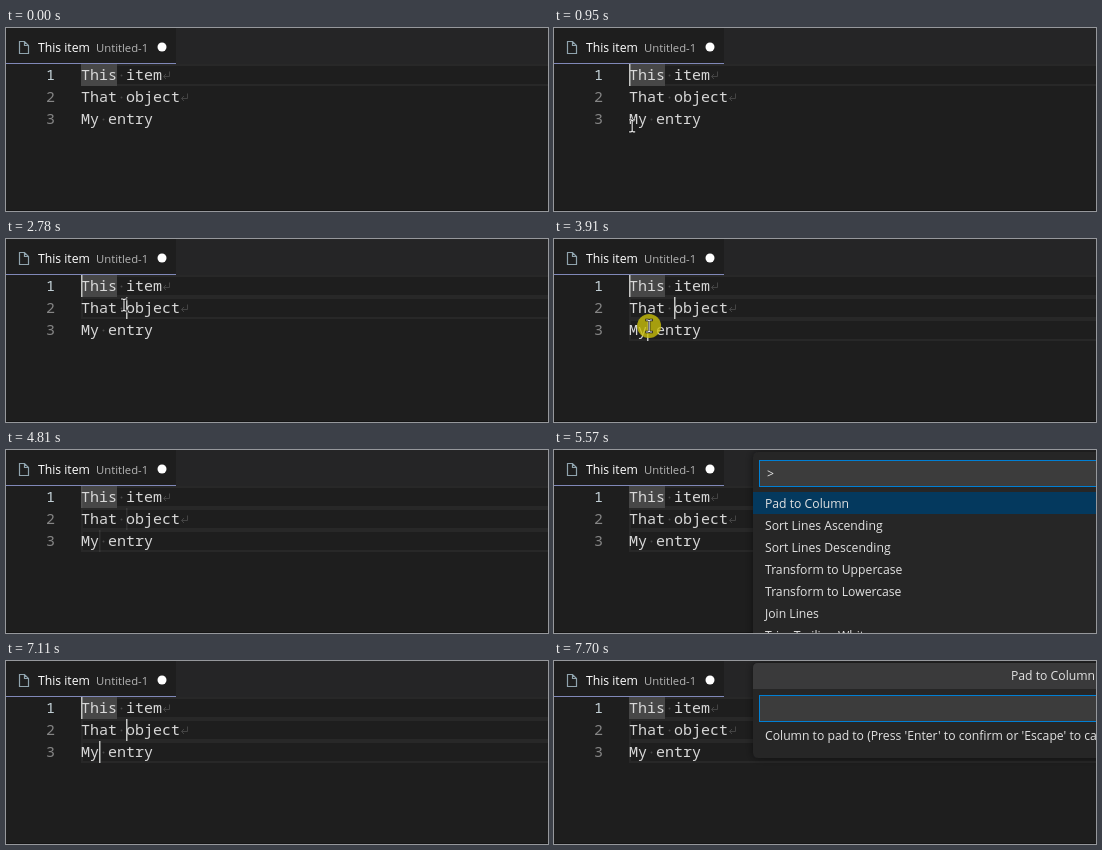
An HTML page for the animation above (8000 ms loop, 542 by 183 pixels).

```html
<!DOCTYPE html>
<html lang="en">
<head>
<meta charset="utf-8">
<title>Multi-cursor padding</title>
<style>
  html, body { margin: 0; width: 100%; height: 100%; overflow: hidden; background: #1e1e1e; }
  svg { display: block; width: 542px; height: 183px; }
  text { white-space: pre; }
  .code { font: 500 15px "Noto Sans Mono", "DejaVu Sans Mono", monospace; fill: #d8d8d8; }
  .num { fill: #858585; font-weight: 400; }
  .num.active { fill: #c6d4da; }
  .ui { font: 12.2px "Open Sans", "Noto Sans", sans-serif; fill: #e2e2e2; }
  .field { fill: #3c3c3c; stroke: #007fd4; }
  .caret { fill: #c4c5c3; }
  .line { fill: none; stroke: #282828; stroke-width: 2; }
  .beam { fill: none; stroke: #f0f0f0; stroke-width: 1.1; stroke-linecap: square; }
  .beam.edge { stroke: #111; stroke-width: 2.4; }
</style>
</head>
<body>
<svg viewBox="0 0 542 183">
  <defs>
    <filter id="shadow" x="-10%" y="-20%" width="120%" height="140%">
      <feDropShadow dx="0" dy="0" stdDeviation="4" flood-color="#000" flood-opacity=".5"/>
    </filter>
    <path id="beam" d="M-2.5 -6h1.5l1 1l1 -1h1.5M0 -5v10M-2.5 6h1.5l1 -1l1 1h1.5"/>
  </defs>

  <rect width="542" height="183" fill="#1e1e1e"/>
  <rect x="170" width="372" height="36" fill="#252526"/>
  <rect y="35" width="170" height="1" fill="#8088b8"/>
  <path d="M13.5 13.5h5l4 4v8h-9zM18.5 13.5v4h4" fill="none" stroke="#90a4ae" stroke-width="1.2"/>
  <text class="ui" x="32" y="24" style="fill:#fff">This item</text>
  <text class="ui" x="90" y="24" style="fill:#b4b4b4;font-size:11.3px">Untitled-1</text>
  <circle cx="156" cy="19" r="4.5" fill="#fff"/>

  <g id="lines"></g>
  <rect x="75" y="36" width="36" height="22" fill="#474747"/>
  <g id="editor"></g>
  <g id="carets"></g>
  <rect y="182" width="542" height="1" fill="#151515"/>

  <g id="palette">
    <rect x="199" y="2" width="600" height="200" rx="5" fill="#252526" filter="url(#shadow)"/>
    <rect class="field" x="205.5" y="10.5" width="586" height="26"/>
    <text class="ui" x="213" y="28">&gt;</text>
    <rect id="paletteCaret" class="caret" x="221" y="15" width="1" height="17"/>
    <rect x="199" y="42" width="600" height="22" fill="#04395e"/>
    <g id="commands"></g>
  </g>

  <g id="prompt">
    <rect x="199" y="2" width="600" height="95" rx="5" fill="#252526" filter="url(#shadow)"/>
    <path d="M199 28v-21q0 -5 5 -5h595v26z" fill="#3a3a3b"/>
    <text class="ui" x="457" y="18.5">Pad to Column</text>
    <rect class="field" x="205.5" y="34.5" width="586" height="26"/>
    <rect id="promptCaret" class="caret" y="39" width="1" height="17"/>
    <text id="message" class="ui" x="211" y="79"></text>
  </g>

  <g id="mouse">
    <circle id="press" r="12" fill="#c8be0a" fill-opacity=".8"/>
    <use href="#beam" class="beam edge"/>
    <use href="#beam" class="beam"/>
  </g>
</svg>
<script>
const LOOP = 8000, LEFT = 75, TOP = 36, ROW = 22, CHAR = 9;
const PALETTE = 4930, FIRST_PROMPT = 6070, CONFIRM = 7110, SECOND_PROMPT = 7660;
const PRESS = 140, BLINK = 500, FADE = 180;

const $ = id => document.getElementById(id);
const show = (id, on) => { $(id).style.display = on ? '' : 'none'; };
const within = (t, a, b) => t >= a && t < b;
const clamp = v => Math.min(1, Math.max(0, v));

function add(parent, tag, attrs, text = '') {
  const el = document.createElementNS('http://www.w3.org/2000/svg', tag);
  for (const key in attrs) el.setAttribute(key, attrs[key]);
  el.textContent = text;
  return parent.appendChild(el);
}

// Each row gains a caret when it is clicked; the first has one already
const rows = [
  { text: 'This item', column: 0, click: 1160 },
  { text: 'That object', column: 5, click: 2450 },
  { text: 'My entry', column: 2, click: 3910 }
];
rows.forEach((row, i) => {
  const y = TOP + i * ROW, base = y + 16, end = LEFT + row.text.length * CHAR;
  const editor = $('editor');
  row.line = add($('lines'), 'rect', { class: 'line', x: LEFT + 1, y: y + 1, width: 500, height: ROW - 2 });
  add(editor, 'text', { class: i ? 'code num' : 'code num active', x: 40, y: base }, i + 1);
  add(editor, 'text', { class: 'code', x: LEFT, y: base }, row.text);
  add(editor, 'circle', { cx: LEFT + (row.text.indexOf(' ') + .5) * CHAR, cy: y + 11.5, r: 1, fill: '#484848' });
  if (i < rows.length - 1) {
    add(editor, 'path', {
      d: `M${end + 7.5} ${y + 7.5}v5h-6m2.5 -2.5l-2.5 2.5l2.5 2.5`, fill: 'none', stroke: '#444'
    });
  }
  row.caret = add($('carets'), 'rect', {
    class: 'caret', x: LEFT + row.column * CHAR, y, width: 1.5, height: ROW
  });
});

['Pad to Column', 'Sort Lines Ascending', 'Sort Lines Descending', 'Transform to Uppercase',
 'Transform to Lowercase', 'Join Lines', 'Trim Trailing Whitespace'].forEach((name, i) =>
  add($('commands'), 'text', { class: 'ui', x: 211, y: 57.5 + i * ROW }, name));

const entry = { x: 101, y: 184, start: 290, leave: 4400 };
const moves = [
  { from: 590, to: 1160, x: 77, y: 48 },
  { from: 1570, to: 2170, x: 118, y: 65 },
  { from: 2330, to: 2450, x: 119.5, y: 72.5 },
  { from: 2610, to: 2780, x: 118, y: 66 },
  { from: 3140, to: 3620, x: 95, y: 87 },
  { from: 3910, to: 4030, x: 99.5, y: 95.5 },
  { from: 4300, to: 4360, x: 280, y: 170 }
];

// Sideways motion eases out while vertical motion is steady, which bends the path
function mouseAt(t) {
  let { x, y } = entry;
  for (const move of moves) {
    const k = clamp((t - move.from) / (move.to - move.from));
    x += (move.x - x) * (1 - (1 - k) ** 3);
    y += (move.y - y) * k;
  }
  return [x, y];
}

// Blinking starts afresh at each of these moments
const resets = [590, 1270, 2610, 4150, CONFIRM];

function caretOpacity(t) {
  const focused = t < PALETTE || within(t, CONFIRM, SECOND_PROMPT);
  const last = resets.filter(r => r <= t).pop();
  if (!focused || last === undefined) return 0;
  const phase = (t - last) % (2 * BLINK);
  return clamp(1 - (phase - BLINK) / FADE);
}

function draw(t) {
  rows.forEach((row, i) => {
    const display = i === 0 || t >= row.click ? '' : 'none';
    row.line.style.display = row.caret.style.display = display;
  });
  $('carets').setAttribute('opacity', caretOpacity(t));

  show('palette', within(t, PALETTE, FIRST_PROMPT));
  show('paletteCaret', t < 5570);

  show('prompt', within(t, FIRST_PROMPT, CONFIRM) || t >= SECOND_PROMPT);
  show('promptCaret', t < 6650);
  $('promptCaret').setAttribute('x', t < FIRST_PROMPT + 40 ? 213 : 216);
  $('message').textContent = (t < CONFIRM ? 'Character to insert' : 'Column to pad to') +
    " (Press 'Enter' to confirm or 'Escape' to cancel)";

  show('mouse', within(t, entry.start, entry.leave));
  show('press', rows.some(row => within(t, row.click, row.click + PRESS)));
  $('mouse').setAttribute('transform', `translate(${mouseAt(t)})`);
}

const start = performance.now();
function tick() {
  draw((performance.now() - start) % LOOP);
  requestAnimationFrame(tick);
}
tick();
</script>
</body>
</html>
```
